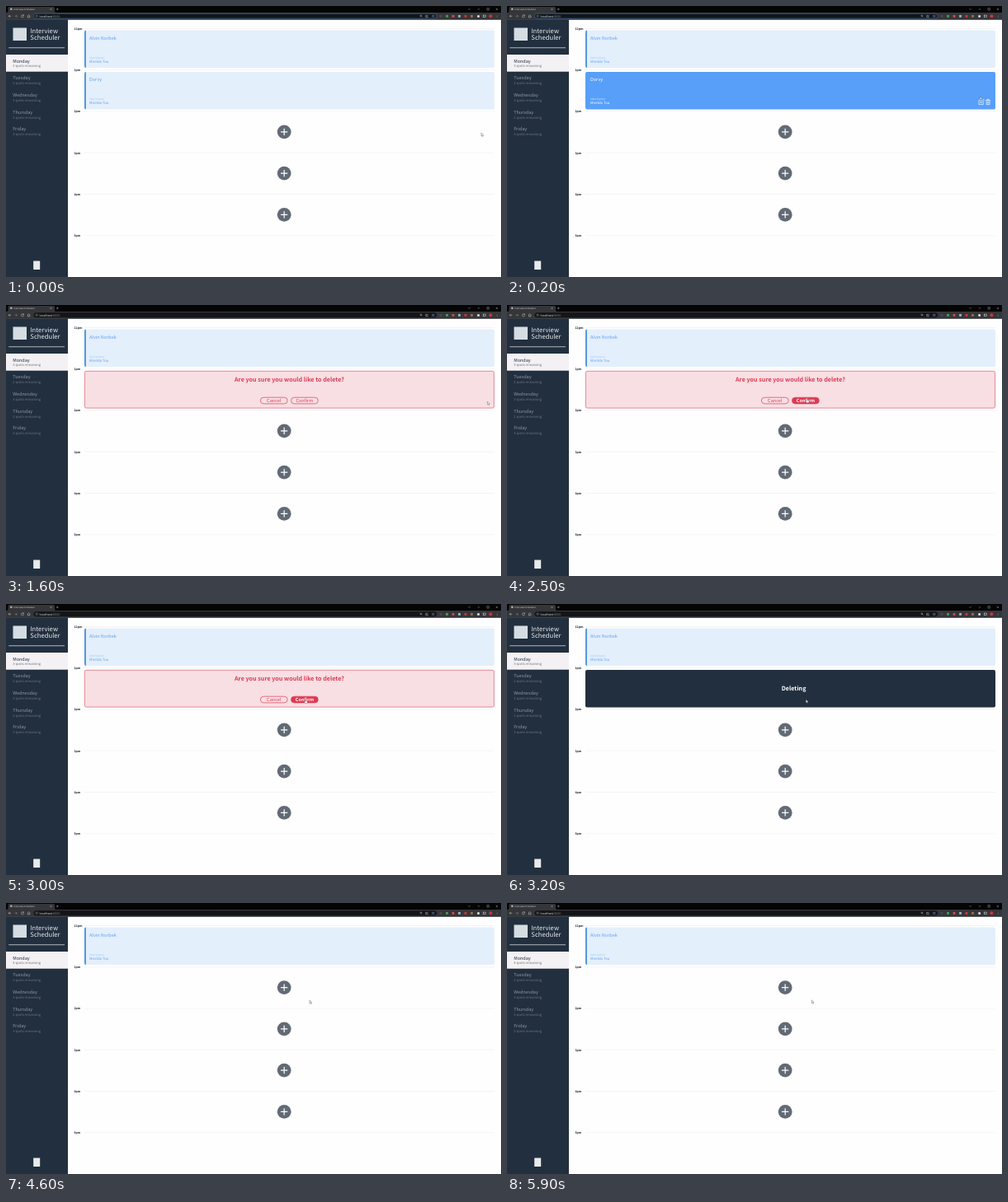
Recreate the animation shown at these times as an HTML page. Size 600 by 329 pixels, loop 6.2 s.

```html
<!DOCTYPE html>
<html lang="en">
<head>
<meta charset="utf-8">
<title>Interview Scheduler</title>
<style>
  html, body { margin: 0; width: 100%; height: 100%; overflow: hidden; background: #fefefe; }
  svg { display: block; width: 100%; height: 100%; }
  text {
    font-family: "Noto Sans CJK JP", "Noto Sans CJK SC", "Noto Sans CJK", "Noto Sans", sans-serif;
    text-rendering: geometricPrecision;
  }
  .ui { font-family: "Open Sans", "Noto Sans", sans-serif; }
</style>
</head>
<body>
<svg id="stage" viewBox="0 0 600 329" xmlns="http://www.w3.org/2000/svg"></svg>
<script>
const LOOP = 6200, STEP = 100;
const NAVY = '#222f3e', BLUE = '#579ff9', RED = '#dc3b54';
const ROW = 50.25;

const tag = (name, attrs, body = '') =>
  `<${name} ${Object.entries(attrs).map(([k, v]) => `${k}="${v}"`).join(' ')}>${body}</${name}>`;
const rect = (x, y, width, height, fill, more = {}) => tag('rect', { x, y, width, height, fill, ...more });
const dot = (cx, cy, r, fill, more = {}) => tag('circle', { cx, cy, r, fill, ...more });
const line = (d, stroke, width = 0.7, more = {}) =>
  tag('path', { d, stroke, 'stroke-width': width, fill: 'none', ...more });
const text = (x, y, size, fill, str, more = {}) =>
  tag('text', { x, y, 'font-size': size, fill, ...more }, str);
const group = (id, body) => tag('g', { id }, body);
const mid = { 'text-anchor': 'middle' };
const bold = { 'font-weight': 600 };
const ui = { class: 'ui' };

function browser() {
  const grey = '#c4c6c9', bar = '#35363a';
  const icons = ['#454a50', '#4c9a5b', '#d94a42', '#a7b0bb', '#d8352f', '#98704c'];
  return rect(0, 0, 600, 8, '#050505') +
    tag('path', { d: 'M1 8Q2.5 8 2.5 6V2.6Q2.5 1 4 1H57.5Q59 1 59 2.6V6Q59 8 60.5 8Z', fill: bar }) +
    rect(5.2, 2.7, 2.2, 2.2, '#b9bcc0') +
    text(9.6, 5, 2.75, '#e3e4e6', 'Interview Scheduler', ui) +
    line('M53.6 3l1.8 1.8m0-1.8l-1.8 1.8M61 3.9h2.6M62.3 2.6v2.6', grey, 0.45) +
    line('M560.3 3.2l1.3 1.3 1.3-1.3M571.8 3.9h2.4M583 2.7h2.4v2.4h-2.4zM593.8 2.8l2.2 2.2m0-2.2l-2.2 2.2', grey, 0.4) +
    rect(0, 8, 600, 8.8, bar) +
    rect(33.5, 9.2, 488.5, 6, '#141518', { rx: 3 }) +
    rect(33.5, 9.2, 488.5, 6, 'none', { id: 'focus', rx: 3, stroke: '#3f77b5', 'stroke-width': 0.6 }) +
    line('M6.2 12.3H3.2m1.4-1.4l-1.4 1.4 1.4 1.4', grey, 0.55) +
    line('M10.5 12.3h3m-1.4-1.4l1.4 1.4-1.4 1.4', '#85888c', 0.55) +
    line('M21 11.3a1.5 1.5 0 1 0 .4 1.3M21.5 10.4v1.3h-1.3', grey, 0.55) +
    line('M25.9 12.3l1.7-1.6 1.7 1.6M26.4 12v1.9h2.4V12', grey, 0.55) +
    dot(37.2, 12.2, 1.2, 'none', { stroke: grey, 'stroke-width': 0.4 }) +
    text(40.5, 13.5, 3.7, '#f0f0f0', 'localhost<tspan fill="#888c91">:8000</tspan>', ui) +
    line('M504.4 13.4l-.8-.8M510 11.4h-1.3v2.2h2.8v-.8M510 12.6q0-1.4 1.7-1.4', grey, 0.5) +
    dot(502.9, 11.9, 0.9, 'none', { stroke: grey, 'stroke-width': 0.5 }) +
    line('M517.8 10.8l.5 1h1.1l-.8.7.3 1.1-1.1-.6-1.1.6.3-1.1-.8-.7h1.1z', '#7eaeea', 0.4) +
    icons.map((c, i) => rect(525.6 + i * 7.5, 11, 2.8, 2.8, c)).join('') +
    rect(571.3, 11.2, 2.6, 2.6, '#f0f0f0', { rx: 0.5 }) +
    rect(578.6, 11.1, 2.6, 2.4, 'none', { stroke: '#f0f0f0', 'stroke-width': 0.5 }) +
    dot(587.4, 12.3, 2, '#d13438') +
    [-1, 0, 1].map(i => dot(595.2, 12.3 + i * 1.1, 0.3, grey)).join('');
}

function sidebar() {
  const days = [['Monday', 3], ['Tuesday', 2], ['Wednesday', 3], ['Thursday', 2], ['Friday', 3]];
  const items = days.map(([day, spots], i) => {
    const y = 68.6 + i * 20.7;
    return text(8.2, y, 5.5, i ? '#8e98a5' : NAVY, day) +
      text(8.2, y + 5.8, 4.1, i ? '#6c7784' : '#6e737d',
        `<tspan${i ? '' : ' id="spots"'}>${spots}</tspan> spots remaining`);
  });
  const title = { 'font-weight': 300 };
  return rect(0, 16.2, 75, 312.8, NAVY) +
    rect(8.5, 26.5, 16.5, 15.5, '#d5dde3') +
    text(29.3, 33.3, 7.7, '#e6e9ed', 'Interview', title) +
    text(29.3, 41, 7.7, '#e6e9ed', 'Scheduler', title) +
    rect(3.2, 50.3, 67.8, 0.9, '#bfc4ca') +
    rect(0, 59, 75, 20.7, '#f4f1f4') +
    items.join('') +
    rect(33.2, 309.5, 8, 10.5, '#e8eaec');
}

function booking(y, name, active) {
  const ink = active ? '#fff' : '#659ff4';
  const box = active
    ? rect(95, y, 497, 45.5, BLUE, { rx: 2 })
    : rect(95, y, 497, 45.5, '#e3effb', { rx: 2 }) +
      tag('path', { d: `M97 ${y}q-2 0-2 2v41.5q0 2 2 2z`, fill: '#5598dc' });
  return box +
    text(101, y + 10.9, 5.5, ink, name) +
    text(101, y + 34.1, 3.4, active ? '#d6e7fd' : '#a5c5f4', 'Interviewer') +
    text(101, y + 39.3, 4.3, ink, 'Mirelda Tou');
}

function tools() {
  return line('M575.8 114.3H572v5.3h5.3v-3M574 117.7l.3-1.4 3.1-3.1 1.1 1.1-3.1 3.1z', '#fff', 0.65) +
    line('M580.4 114.5h5.4M582 114.4v-1.1h2.2v1.1M581.1 114.6v5h4v-5M582.4 115.8v2.6M583.8 115.8v2.6', '#fff', 0.65);
}

const pill = (x, label, filled) =>
  rect(x, 112.2, 32.8, 7.7, filled ? RED : 'none', { rx: 3.85, stroke: RED, 'stroke-width': 0.7 }) +
  text(x + 16.4, 118, 5.55, filled ? '#fff' : RED, label, { ...mid, ...(filled ? bold : {}) });

function confirmCard() {
  return rect(95.4, 80.3, 496.2, 44.8, '#f8dfe3', { rx: 2, stroke: '#dc5d70', 'stroke-width': 0.7 }) +
    text(343.5, 92.7, 7.2, RED, 'Are you sure you would like to delete?', { ...mid, ...bold }) +
    pill(308.4, 'Cancel') +
    group('plain', pill(345.5, 'Confirm')) +
    group('filled', pill(345.5, 'Confirm', true));
}

const plus = row => dot(337.2, 102.6 + row * ROW, 8.4, '#626a75') +
  line(`M333.1 ${102.6 + row * ROW}h8.2m-4.1-4.1v8.2`, '#fff', 1.2);

function schedule() {
  const hours = ['12pm', '1pm', '2pm', '3pm', '4pm', '5pm'].map((h, i) => {
    const y = 27.5 + i * ROW;
    return line(`M95 ${y}H592`, '#efeff1', 0.6) + text(82.4, y + 1.3, 3.6, '#1d2733', h, bold);
  });
  return hours.join('') +
    booking(29.6, 'Alvin Norbek') +
    [1, 2, 3].map(plus).join('') +
    group('idle', booking(79.9, 'Dorvy')) +
    group('hover', booking(79.9, 'Dorvy', true) + tools()) +
    group('confirm', confirmCard()) +
    group('deleting', rect(95, 79.9, 497, 45.5, NAVY, { rx: 2 }) +
      text(347.6, 105.4, 7.2, '#fff', 'Deleting', { ...mid, ...bold })) +
    group('empty', plus(0));
}

function pointer() {
  const look = { fill: '#fff', stroke: '#30343a', 'stroke-width': 0.35, 'stroke-linejoin': 'round' };
  return group('cursor',
    tag('path', { id: 'arrow', d: 'M0 0V3.9L.9 3.1 1.6 4.5 2.2 4.2 1.6 2.9H2.8Z', ...look }) +
    tag('path', { id: 'hand', d: 'M0 .4Q.5-.3 1 .4V1.8L3 2.2V3.8L2.5 4.8H.5L-1 2.8-.5 2.3 0 2.8Z', ...look }));
}

document.getElementById('stage').innerHTML =
  rect(0, 0, 600, 329, '#fefefe') + schedule() + sidebar() + browser() + pointer();

const ids = ['idle', 'hover', 'confirm', 'deleting', 'empty', 'spots', 'focus',
  'plain', 'filled', 'cursor', 'arrow', 'hand'];
const parts = Object.fromEntries(ids.map(id => [id, document.getElementById(id)]));

// Start time of each state of the 1pm slot
const states = [[0, 'idle'], [200, 'hover'], [1500, 'confirm'], [3200, 'deleting'], [4600, 'empty']];

// Time, x, y of the cursor tip
const track = [
  [0, 576, 154], [200, 573.3, 110], [700, 575, 114], [1100, 583.5, 117],
  [1600, 583.5, 117], [2000, 477, 115], [2500, 363, 114],
  [3000, 362.4, 116], [3400, 362.4, 116], [3900, 319, 97],
  [4600, 368, 118], [4900, 369.3, 117.7], [LOOP, 369.3, 117.7]
];

function cursorAt(t) {
  const i = track.findIndex(p => p[0] > t);
  const [a, b] = [track[i - 1], track[i]];
  const k = (t - a[0]) / (b[0] - a[0]);
  return [a[1] + (b[1] - a[1]) * k, a[2] + (b[2] - a[2]) * k];
}

const show = (node, on) => node.style.display = on ? '' : 'none';

function draw(time) {
  const t = Math.floor((time % LOOP) / STEP) * STEP;
  const state = states.filter(s => s[0] <= t).pop()[1];
  states.forEach(([, name]) => show(parts[name], name === state));
  parts.spots.textContent = state === 'empty' ? 4 : 3;
  show(parts.focus, state === 'idle' || state === 'hover');

  const [x, y] = cursorAt(t);
  const onConfirm = state === 'confirm' && x < 378;
  const onButton = onConfirm || (state === 'hover' && x > 580);
  show(parts.filled, onConfirm);
  show(parts.plain, !onConfirm);
  parts.cursor.setAttribute('transform', `translate(${x} ${y})`);
  show(parts.hand, onButton);
  show(parts.arrow, !onButton);
}

const start = performance.now();
function tick() {
  draw(performance.now() - start);
  requestAnimationFrame(tick);
}
tick();
</script>
</body>
</html>
```
